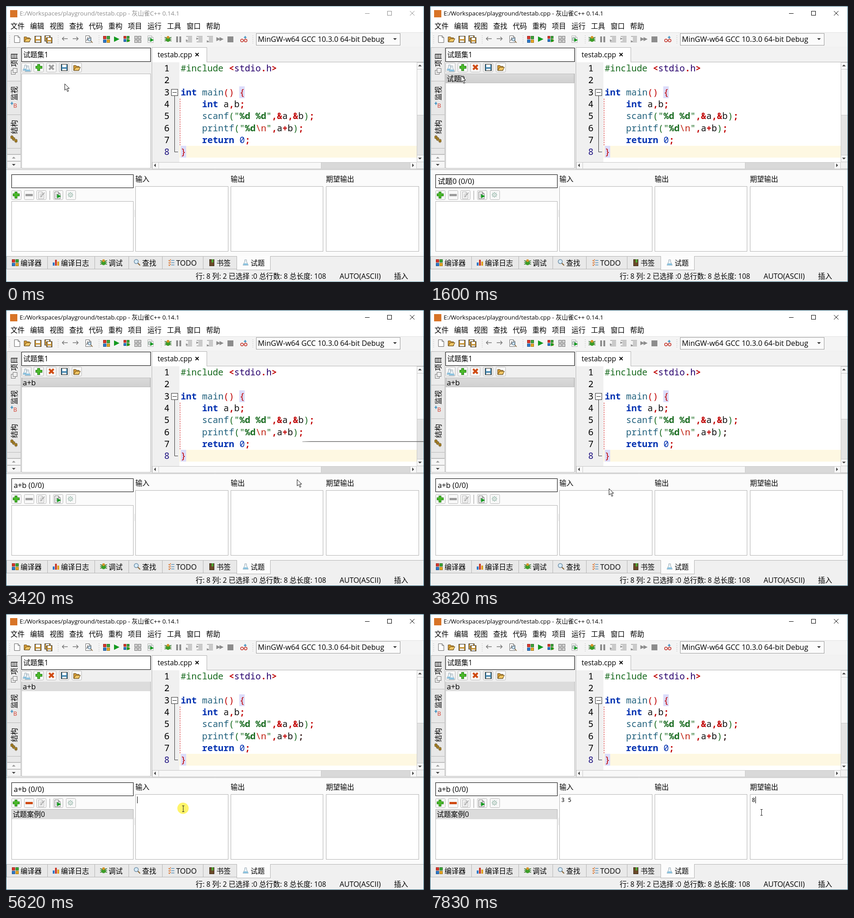
An HTML page with a canvas that plays this animation: 921x608 px, repeating every 8 s.

```html
<!DOCTYPE html>
<html lang="zh-CN">
<head>
<meta charset="utf-8">
<title>IDE</title>
<style>
html, body { margin: 0; width: 921px; height: 608px; overflow: hidden; background: #f0f0f0; }
canvas { display: block; }
</style>
</head>
<body>
<canvas id="stage" width="921" height="608"></canvas>
<script>
const g = document.getElementById('stage').getContext('2d');
const LOOP = 8000;
const UI = '"Open Sans", "Noto Sans CJK SC", "Noto Sans CJK JP", sans-serif';
const MONO = '"Noto Sans Mono", "DejaVu Sans Mono", monospace';
const RED = '#c00000', GREEN = '#176a1e', BLUE = '#0030b0', TEAL = '#20607c', INK = '#101010';
const GRAY = '#8c8c8c', EDGE = '#b4b4b4', PALE = '#b2b2b2';

function box(x, y, w, h, fill, stroke) {
  if (fill) { g.fillStyle = fill; g.fillRect(x, y, w, h); }
  if (stroke) { g.strokeStyle = stroke; g.lineWidth = 1; g.strokeRect(x + .5, y + .5, w - 1, h - 1); }
}
function path(points, stroke, fill, width = 1) {
  g.beginPath();
  for (let i = 0; i < points.length; i += 2) g.lineTo(points[i], points[i + 1]);
  if (fill) { g.closePath(); g.fillStyle = fill; g.fill(); }
  if (stroke) { g.strokeStyle = stroke; g.lineWidth = width; g.stroke(); }
}
function disc(x, y, r, fill, stroke, width = 1) {
  g.beginPath();
  g.arc(x, y, r, 0, Math.PI * 2);
  if (fill) { g.fillStyle = fill; g.fill(); }
  if (stroke) { g.strokeStyle = stroke; g.lineWidth = width; g.stroke(); }
}
function text(s, x, y, size = 15.5, color = '#000', family = UI, weight = 400) {
  g.font = `${weight} ${size}px ${family}`;
  g.fillStyle = color;
  g.fillText(s, x, y);
}
const tri = (x, y, r, dir, c) => dir === 'r' ? path([x - r, y - r, x + r, y, x - r, y + r], null, c)
  : dir === 'l' ? path([x + r / 2, y - r, x - r / 2, y, x + r / 2, y + r], null, c)
  : path([x - r, y - dir * r / 2, x + r, y - dir * r / 2, x, y + dir * r / 2], null, c);

// Icons, each centred on x, y
function plus(x, y) {
  box(x - 7, y - 3, 15, 6, '#1f7a12'); box(x - 3, y - 7, 6, 15, '#1f7a12');
  box(x - 6, y - 2, 13, 4, '#4cbb2c'); box(x - 2, y - 6, 4, 13, '#4cbb2c');
}
function minus(x, y, c) { box(x - 8, y - 3, 16, 5, c); }
function cross(x, y, c, r = 5, w = 4) {
  path([x - r, y - r, x + r, y + r], c, null, w);
  path([x + r, y - r, x - r, y + r], c, null, w);
}
function page(x, y, fill = '#fff', c = '#666') {
  path([x - 5.5, y - 7.5, x + 2.5, y - 7.5, x + 6.5, y - 3.5, x + 6.5, y + 7.5, x - 5.5, y + 7.5, x - 5.5, y - 7.5], c, fill);
  path([x + 2.5, y - 7.5, x + 2.5, y - 3.5, x + 6.5, y - 3.5], c);
}
function folder(x, y) {
  path([x - 7, y + 6, x - 7, y - 5, x - 2, y - 5, x, y - 3, x + 5, y - 3, x + 5, y + 6], '#5c4212', '#d59a35');
  path([x - 7, y + 6, x - 2, y - 1, x + 8, y - 1, x + 4, y + 6, x - 7, y + 6], '#5c4212', '#f2c766');
}
function floppy(x, y, c, r = 7) {
  box(x - r, y - r, 2 * r + 1, 2 * r + 1, c, '#302a20');
  box(x - r + 3, y - r + 1, 2 * r - 5, r - 1, '#fff');
  box(x - r + 3, y + 3, 2 * r - 5, r - 3, '#e8e8e8');
}
function tiles(x, y, cs = ['#d9362b', '#3aa336', '#2b78c9', '#e6a722'], r = 7, edge = 'rgba(0,0,0,.3)') {
  cs.forEach((c, i) => box(x - r + (i % 2) * (r + 1), y - r + (i >> 1) * (r + 1), r, r, c, edge));
}
function bug(x, y) {
  for (const s of [-1, 1]) for (const d of [-4, 0, 4]) path([x, y + d / 2, x + s * 7.5, y + d], '#27651b', null, 1.4);
  disc(x, y + 1, 5, '#3c9d28');
  disc(x, y - 4, 3, '#d39429');
}
function gear(x, y, r, c) {
  for (let i = 0; i < 8; i++) {
    const a = i * Math.PI / 4;
    path([x + r * .6 * Math.cos(a), y + r * .6 * Math.sin(a), x + r * Math.cos(a), y + r * Math.sin(a)], c, null, 2);
  }
  disc(x, y, r * .6, '#f4f4f4', c, 1.4);
  disc(x, y, 1.2, c);
}
function flask(x, y) {
  path([x - 2, y - 6, x - 2, y - 2, x - 6, y + 6, x + 6, y + 6, x + 2, y - 2, x + 2, y - 6], '#94a3ac', '#edf5fa');
  path([x - 4, y + 2, x - 6, y + 6, x + 6, y + 6, x + 4, y + 2], null, '#8bc2df');
}
function lens(x, y, r = 4.5) {
  path([x, y, x + r + 2, y + r + 2], '#8a6a3b', null, r / 2);
  disc(x - 2, y - 2, r, '#d8ecf8', '#6d8ca5', 1.5);
}
function arrow(x, y, d) {
  path([x - 6, y, x + 6, y], '#6f6f6f', null, 1.4);
  path([x + d * 2, y - 4, x + d * 6, y, x + d * 2, y + 4], '#6f6f6f', null, 1.4);
}
function steps(x, y, d) {
  for (let i = 0; i < 5; i++) path([x - (i % 4 ? 2 : 6), y - 6 + i * 3, x + 7, y - 6 + i * 3], GRAY, null, 1.2);
  tri(x - 4, y + d, 2.5, 'r', GRAY);
}
function notes(x, y, c) {
  page(x, y, '#f6f6f6', c);
  for (let i = -3; i < 6; i += 3) path([x - 3, y + i + .5, x + 4, y + i + .5], c);
}
function button(x, y, hover) {
  g.beginPath();
  g.roundRect(x + .5, y + .5, 21, 20, 2);
  g.fillStyle = hover ? '#d6d6d6' : '#f8f8f8';
  g.fill();
  g.strokeStyle = '#b8b8b8';
  g.lineWidth = 1;
  g.stroke();
}

function titleBar(active) {
  const c = active ? '#000' : '#8d8d8d';
  box(0, 0, 921, 58, '#fff');
  box(9, 9, 16, 16, '#d87427');
  text('E:/Workspaces/playground/testab.cpp -', 30, 21, 13.3, c);
  text('灰山雀C++ 0.14.1', 277, 21, 13.4, c);
  path([791, 16.5, 801, 16.5], c);
  box(840, 11, 10, 10, null, c);
  cross(895, 16, c, 5, 1);
  ['文件', '编辑', '视图', '查找', '代码', '重构', '项目', '运行', '工具', '窗口', '帮助']
    .forEach((s, i) => text(s, 10 + i * 43.1, 50));
}

function toolBar() {
  const y = 73;
  box(0, 58, 921, 32, '#f4f4f4');
  path([0, 58.5, 921, 58.5], '#e0e0e0');
  for (const x of [7, 114, 204, 341, 543]) for (let i = 0; i < 5; i++) box(x, 65 + i * 4, 2, 1, '#c4c4c4');
  page(24, y);
  folder(47, y);
  floppy(70, y, '#c79437');
  floppy(91, y - 2, '#c79437', 6);
  floppy(95, y + 2, '#c79437', 6);
  arrow(130, y - 1, -1);
  arrow(153, y - 1, 1);
  page(181, y); text('A', 177, y + 4, 10, '#333'); lens(186, y + 3, 3);
  tiles(221, y);
  tri(244, y, 6, 'r', '#149a20');
  tiles(265, y - 1, undefined, 6); tri(270, y + 3, 4, 'r', '#149a20');
  tiles(290, y, Array(4).fill('#d2d2d2'), 7, '#777');
  page(318, y, '#f8f8f8', PALE); gear(317, y, 5, '#9fb5a9'); tri(322, y + 2, 4, 'r', '#149a20');
  bug(357, y);
  box(375, 67, 4, 13, GRAY); box(382, 67, 4, 13, GRAY);
  steps(403, y, 3); steps(426, y, -1); steps(449, y, 5);
  tri(468, y, 4.5, 'r', GRAY); tri(475, y, 4.5, 'r', GRAY);
  box(488, 67, 13, 13, GRAY);
  disc(520, 76, 3, null, '#c3342a', 1.5); disc(528, 76, 3, null, '#c3342a', 1.5);
  path([527, 66, 527, 72], '#2583b9', null, 1.5); path([524, 69, 530, 69], '#2583b9', null, 1.5);
  box(551, 60, 318, 27, '#fbfbfb', '#9c9c9c');
  text('MinGW-w64 GCC 10.3.0 64-bit Debug', 555, 79, 16.15);
  tri(857, 73, 4, 1, '#333');
}

function sideTabs() {
  ['项目', '监视', '结构'].forEach((s, i) => {
    const y = 91 + i * 74;
    box(2, y, 31, 75, i ? '#e8e8e8' : '#ececec', '#b9b9b9');
    g.save();
    g.translate(24, y + 43);
    g.rotate(-Math.PI / 2);
    text(s, 0, 0);
    g.restore();
  });
  box(11, 141, 10, 10, '#eee', '#777'); box(15, 137, 10, 10, '#eee', '#777');
  text('B', 16, 224, 13, '#d33a2c');
  path([10, 214.5, 16, 214.5], '#2583b9', null, 1.5); path([13, 211, 13, 218], '#2583b9', null, 1.5);
  for (const [x, y] of [[11, 288], [15, 292], [20, 296]]) {
    box(x - 1, y - 2, 6, 6, '#c49a2c', '#70541a'); path([x + 2, y - 4, x + 2, y + 6], '#70541a');
  }
  box(2, 313, 31, 14, '#e8e8e8', '#b9b9b9');
  box(2, 327, 31, 15, '#f6f6f6', '#c2c2c2'); box(2, 342, 31, 16, '#f6f6f6', '#c2c2c2');
  tri(17, 334, 4, -1, '#999'); tri(17, 350, 4, 1, '#444');
}

function row(x, y, w, focused) {
  box(x, y, w, 21, '#dcdcdc');
  if (focused) {
    const s = g.createLinearGradient(0, y, 0, y + 21);
    s.addColorStop(0, '#dadada'); s.addColorStop(1, '#d0d0d0');
    box(x, y, w, 21, s, '#bdbdbd');
  }
}
const caret = (x, y, h) => box(x, y, 1, h, '#000');

function problems(t) {
  const has = t >= 1000, editing = t >= 1820 && t < 2820;
  box(34, 92, 285, 31, '#fff', '#000');
  text('试题集1', 38, 113);
  for (let i = 0; i < 5; i++) button(34 + i * 27.8 | 0, 125, i === 1 && t >= 600 && t < 1400);
  flask(43, 136); flask(48, 138);
  plus(72, 135);
  cross(100, 135, has ? '#cf4a12' : '#9c9c9c');
  floppy(128, 135, '#3c82ad');
  folder(156, 136);
  box(34, 149, 285, 209, '#fff', EDGE);
  if (editing) {
    if (t < 2220) { box(36, 151, 42, 19, '#0078d7'); text('试题0', 37, 166, 15.5, '#fff'); }
    else {
      text(t < 2620 ? 'a' : 'a+', 36, 166, 16);
      caret(t < 2620 ? 46 : 56, 151, 19);
    }
  } else if (has) {
    row(35, 149, 283, t < 5220);
    text(t < 2820 ? '试题0' : 'a+b', 37, 166, t < 2820 ? 15.5 : 16.5);
  }
}

function editor(t) {
  const top = 144, lh = 26.3, cw = 11.778, left = 385;
  box(321, 91, 600, 268, '#f2f2f2');
  box(321, 123, 600, 236, null, EDGE);
  box(321, 91, 122, 34, '#fff', EDGE);
  text('testab.cpp', 334, 113, 15.6);
  cross(421, 107, '#111', 3.5, 2);
  box(322, 124, 583, 220, '#fff');
  box(322, 124, 60, 220, '#f0f0f0');
  box(382, 308, 523, 26, '#fef8e2');
  box(514, 177, 12, 26, '#dcdcfa'); box(385, 308, 12, 26, '#dcdcfa');
  const semi = t >= 3620 ? '#3a2020' : RED;
  const lines = [
    [['#include ', GREEN], ['<', RED, 1], ['stdio', '#26006c'], ['.', RED, 1], ['h', '#26006c'], ['>', RED, 1]],
    [],
    [['int', BLUE, 1], [' main', TEAL], ['()', RED], [' {', RED]],
    [['    int', BLUE, 1], [' a', INK], [',', RED, 1], ['b', INK], [';', RED, 1]],
    [['    scanf', TEAL], ['("', GREEN], ['%d %d', GREEN, 1], ['"', GREEN], [',&', RED, 1], ['a', INK],
      [',&', RED, 1], ['b', INK], [')', GREEN], [';', RED, 1]],
    [['    printf', TEAL], ['("', GREEN], ['%d', GREEN, 1], ['\\n', '#c02010'], ['"', GREEN], [',', RED, 1],
      ['a', INK], ['+', RED, 1], ['b', INK], [')', GREEN], [';', semi, 1]],
    [['    return', BLUE, 1], [' 0', BLUE], [';', RED, 1]],
    [['}', RED]]
  ];
  lines.forEach((line, i) => {
    const y = top + lh * i;
    let x = left;
    text(i + 1, 348.5, y, 19.63, i === 7 ? '#1c1080' : '#000', MONO);
    for (const [s, c, bold] of line) {
      text(s, x, y, 19.63, c, MONO, bold ? 700 : 400);
      x += s.length * cw;
    }
  });
  box(364, 183, 15, 15, '#fff', '#333');
  path([367, 190.5, 376, 190.5], '#222');
  path([371.5, 198, 371.5, 321.5, 379, 321.5], '#333');
  g.setLineDash([3, 2]);
  path([383.5, 204, 383.5, 308], '#d02020');
  g.setLineDash([]);

  box(905, 124, 16, 220, '#e4e4e4', '#c8c8c8');
  box(905, 124, 16, 16, '#f8f8f8', '#c8c8c8');
  box(905, 139, 16, 102, '#f8f8f8', '#c8c8c8');
  box(905, 328, 16, 16, '#f8f8f8', '#c8c8c8');
  tri(912, 131, 4, -1, '#444'); tri(912, 336, 4, 1, '#444');
  box(322, 344, 583, 15, '#d9d9d9', '#c8c8c8');
  box(322, 344, 15, 15, '#f8f8f8', '#c8c8c8');
  box(336, 344, 359, 15, '#f8f8f8', '#c8c8c8');
  box(890, 344, 15, 15, '#f8f8f8', '#c8c8c8');
  tri(328, 351, 4, 'l', '#444');
  path([895, 347, 899, 351, 895, 355], null, '#444');
}

function cases(t) {
  const has = t >= 4820;
  box(1, 360, 919, 191, '#fbfbfb');
  path([1, 360.5, 920, 360.5], EDGE);
  box(12, 371, 269, 30, '#fff', '#000');
  if (t >= 1000) text(t < 2820 ? '试题0 (0/0)' : 'a+b (0/0)', 17, 392, 16.3);
  [12, 40, 67, 104, 132].forEach((x, i) => button(x, 406, i === 0 && t >= 4620 && t < 4820));
  plus(22, 416);
  minus(51, 417, has ? '#cf4a12' : '#9c9c9c');
  notes(77, 417, PALE); path([76, 421, 85, 411], PALE, null, 2);
  path([96.5, 407, 96.5, 427], '#999');
  notes(113, 417, '#777'); tri(117, 419, 4.5, 'r', '#149a20');
  gear(142, 416, 6, '#a9c4b9');
  box(12, 430, 269, 111, '#fff', EDGE);
  if (has) { row(13, 431, 267); text('试题案例0', 15, 447); }
  box(283, 449, 1, 16, '#ddd');
  [['输入', 285, 205], ['输出', 495, 204], ['期望输出', 705, 205]].forEach(([s, x, w]) => {
    text(s, x, 387);
    box(x, 397, w, 144, '#fff', EDGE);
  });
  const input = t < 6020 ? '' : t < 6220 ? '3' : t < 6630 ? '3 ' : '3 5';
  const small = 12.5;
  text(input, 289, 414, small, '#000', MONO);
  if (t >= 5620 && t < 7430) caret(289 + input.length * 7.5 | 0, 402, 15);
  if (t >= 7830) text('8', 709, 414, small, '#000', MONO);
  if (t >= 7430) caret(t >= 7830 ? 717 : 709, 402, 15);
}

function bottomBar() {
  box(0, 551, 921, 57, '#f0f0f0');
  path([0, 551.5, 921, 551.5], EDGE);
  const names = ['编译器', '编译日志', '调试', '查找', 'TODO', '书签', '试题'];
  const edges = [1, 91, 195, 270, 344, 434, 508, 582];
  const labels = [32, 121, 226, 300, 375, 464, 539];
  names.forEach((s, i) => {
    const on = i === 6;
    box(edges[i], 551, edges[i + 1] - edges[i] + 1, on ? 31 : 29, on ? '#fcfcfc' : '#e9e9e9', EDGE);
    if (on) box(edges[i] + 1, 550, 73, 2, '#fcfcfc');
    text(s, labels[i], 572, i === 4 ? 16 : 15.5);
  });
  tiles(20, 565);
  ['#2b78c9', '#c9392b', '#e0a020'].forEach((c, i) => {
    const h = [7, 13, 9][i];
    box(103 + i * 5, 572 - h, 4, h, c);
  });
  bug(215, 565);
  lens(289, 565);
  for (let i = 0; i < 3; i++) {
    path([358, 560 + i * 5, 360, 562 + i * 5, 363, 558 + i * 5], '#d9722b', null, 1.3);
    path([364, 560.5 + i * 5, 371, 560.5 + i * 5], '#4c88b5', null, 1.3);
  }
  box(448, 558, 11, 15, '#6b4a2a', '#3c2a18'); box(453, 558, 4, 7, '#4ca832');
  flask(528, 565);
  text('行: 8 列: 2 已选择 :0 总行数: 8 总长度: 108', 418, 601, 15.4);
  text('AUTO(ASCII)', 735, 601, 16.1);
  text('插入', 855, 601);
}

// Pointer keys: time, x, y
const route = [
  [0, 129, 171], [600, 72, 139], [1200, 72, 139], [1600, 68, 153], [1820, 68, 153], [2220, 864, 196],
  [3220, 864, 196], [3420, 641, 373], [4420, 23, 423], [5020, 23, 423], [5420, 340, 430], [5620, 390, 429],
  [6630, 390, 429], [7030, 600, 462], [7230, 737, 466], [7430, 737, 435], [7630, 737, 435], [7830, 730, 437]
];
const clicks = [[800, 1000], [1820, 2020], [4620, 4820], [5620, 5820], [7430, 7830]];

function pointerAt(t) {
  const i = route.findIndex(k => k[0] > t);
  if (i < 0) return route[route.length - 1].slice(1);
  const [a, ax, ay] = route[i - 1], [b, bx, by] = route[i];
  const p = (t - a) / (b - a);
  return [ax + (bx - ax) * p, ay + (by - ay) * p];
}
function pointer(t) {
  const [x, y] = pointerAt(t).map(Math.round);
  if (clicks.some(([a, b]) => t >= a && t < b)) {
    g.globalCompositeOperation = 'multiply';
    disc(x, y - 1, 12.5, '#fff56a');
    g.globalCompositeOperation = 'source-over';
  }
  const overText = (x > 382 && x < 905 && y > 124 && y < 343) || (x > 285 && x < 909 && y > 397 && y < 541);
  if (overText) {
    path([x + .5, y - 7, x + .5, y + 7], '#222');
    for (const d of [-6.5, 6.5]) path([x - 2, y + d, x + 3, y + d], '#222');
  } else {
    path([0, 0, 0, 14, 3.3, 11, 6, 17, 8.3, 16, 5.7, 10, 10, 10, 0, 0].map((v, i) => v + .5 + (i % 2 ? y : x)), '#111', '#fff');
  }
}

function popupEdge() {
  const s = g.createLinearGradient(653, 0, 672, 0);
  s.addColorStop(0, 'rgba(90,90,90,.3)'); s.addColorStop(1, '#666');
  box(653, 289, 268, 1, s);
  box(653, 290, 268, 1, 'rgba(0,0,0,.25)');
}

// The screen refreshes every 200 ms, with small shifts in phase.
function tick(t) {
  const phase = t < 1820 ? 0 : t < 6630 ? 20 : 30;
  return Math.floor((t - phase) / 200) * 200 + phase;
}

function draw(now) {
  const t = tick(now % LOOP), active = t >= 800;
  box(0, 0, 921, 608, '#f0f0f0');
  titleBar(active);
  toolBar();
  sideTabs();
  problems(t);
  editor(t);
  cases(t);
  bottomBar();
  box(0, 0, 921, 608, null, active ? '#1f5a72' : '#5f93a6');
  if (t >= 3420 && t < 3620) popupEdge();
  pointer(t);
}

let start;
function frame(now) {
  start ??= now;
  draw(Math.max(0, now - start));
  requestAnimationFrame(frame);
}
requestAnimationFrame(frame);
</script>
</body>
</html>
```
